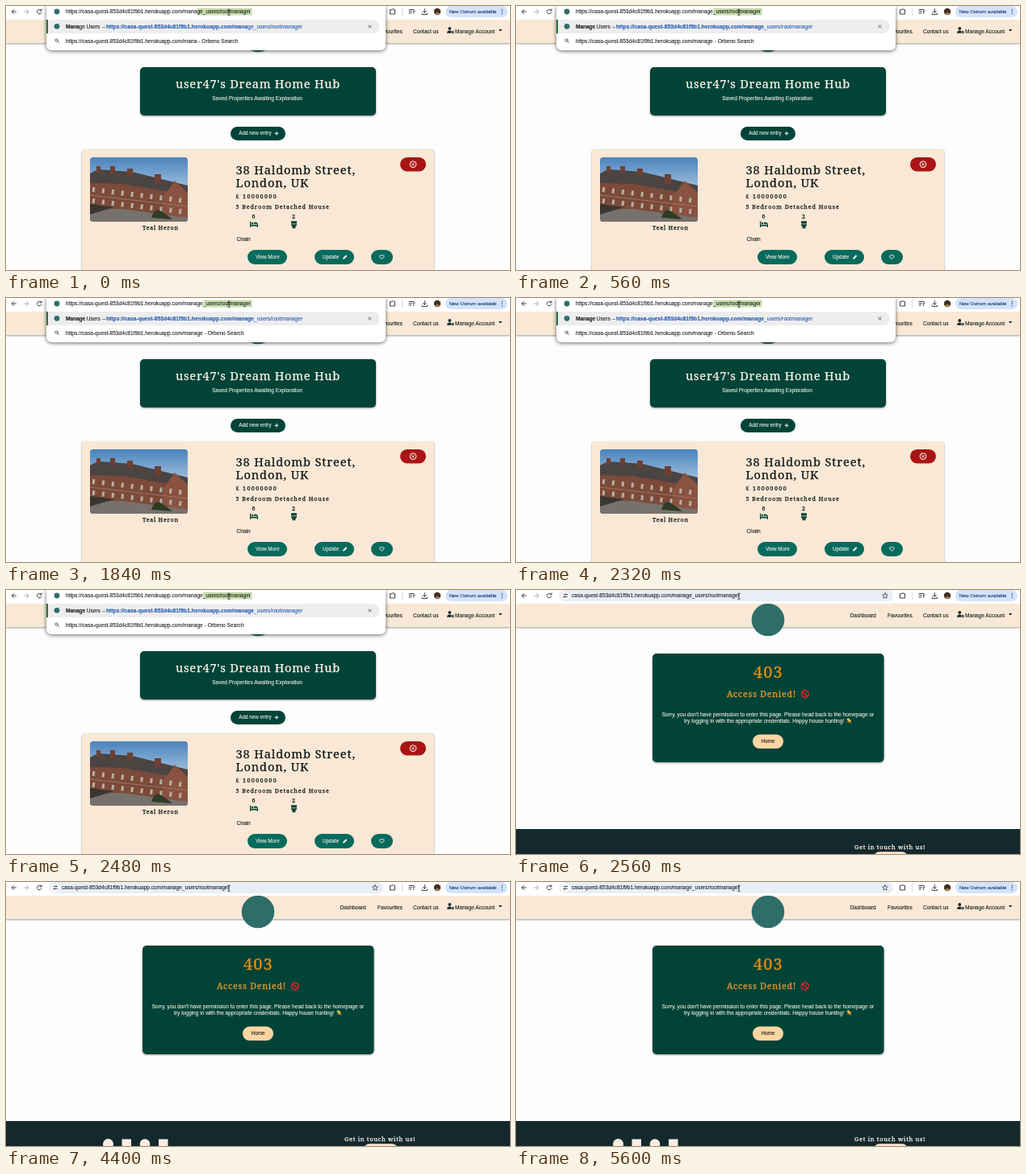
Animation, 624 px wide and 328 px high, one loop 5.68 s. Source, as an HTML page:

```html
<!DOCTYPE html>
<html lang="en">
<head>
<meta charset="utf-8">
<title>Access denied demo</title>
<style>
html, body { margin: 0; width: 100%; height: 100%; overflow: hidden; background: #fdfdfd; }
svg { display: block; width: 624px; height: 328px; }
text {
  --ink: #0c1616;
  font: 6.6px "Liberation Sans", Arial, sans-serif;
  fill: var(--ink); stroke: var(--ink); stroke-width: .08; white-space: pre;
}
.url { font-size: 6.64px; --ink: #17181a; }
.small { font-size: 6.58px; }
.link { --ink: #1c54b2; letter-spacing: .05px; }
.bold { font-weight: 700; }
.serif { font-family: "Noto Serif", serif; stroke-width: .25; }
.head { font-size: 14.6px; letter-spacing: .88px; }
.fact { font-size: 7.1px; letter-spacing: .95px; }
.btn { font-size: 6.3px; }
.light { --ink: #fdf6ee; }
.mid { text-anchor: middle; }
.line { fill: none; stroke: #3c4043; stroke-width: 1; stroke-linecap: round; stroke-linejoin: round; }
.thin { stroke-width: .8; }
.deep { fill: #014337; }
.teal { fill: #066b5d; }
.shade { filter: drop-shadow(0 1px 1px #0006); }

/* One shared 5680 ms clock; every change is a hard cut. */
.before, .after, .social, .sel, .g, .e, .gIn, .eIn { animation: 5680ms step-end infinite; }
.before { animation-name: before; }
.after { animation-name: after; }
.social { animation-name: social; }
.sel { animation-name: select; }
.g { animation-name: boldG; }
.e { animation-name: boldE; }
.gIn { animation-name: typeG; }
.eIn { animation-name: typeE; }
@keyframes before { 0% { visibility: visible } 44.72%, 100% { visibility: hidden } }
@keyframes after { 0% { visibility: hidden } 44.72%, 100% { visibility: visible } }
@keyframes social { 0% { visibility: hidden } 46.48%, 100% { visibility: visible } }
@keyframes select {
  0% { x: 236.8px; width: 67.8px }
  2.817% { x: 240.5px; width: 64.1px }
  5.634%, 100% { x: 244.2px; width: 60.4px }
}
@keyframes boldG { 0% { font-weight: 400 } 2.817%, 100% { font-weight: 700 } }
@keyframes boldE { 0% { font-weight: 400 } 5.634%, 100% { font-weight: 700 } }
@keyframes typeG { 0% { font-size: 0 } 2.817%, 100% { font-size: 6.64px } }
@keyframes typeE { 0% { font-size: 0 } 5.634%, 100% { font-size: 6.64px } }
</style>
</head>
<body>
<svg viewBox="0 0 624 328">
  <defs>
    <linearGradient id="sky" x2="0" y2="1">
      <stop stop-color="#4a83bd"/><stop offset=".5" stop-color="#a3c3de"/>
    </linearGradient>
    <clipPath id="frame"><rect x="104" y="188" width="121" height="80" rx="4"/></clipPath>
  </defs>
  <rect width="624" height="328" fill="#fdfdfd"/>

  <!-- site header -->
  <rect y="17" width="624" height="29" fill="#f9e8d5" class="shade"/>
  <circle cx="312" cy="37" r="20.3" fill="#2f6d69"/>
  <text x="413.5" y="33.8">Dashboard</text>
  <text x="460" y="33.8">Favourites</text>
  <text x="504" y="33.8">Contact us</text>
  <g fill="#14292d">
    <circle cx="549.3" cy="28" r="1.9"/>
    <path d="M546 33.8q0-3.4 3.3-3.4q1.4 0 2 .8l-.4 2.6z"/>
    <circle cx="553" cy="32.4" r="1.2" fill="none" stroke="#14292d" stroke-width="1.1"/>
    <path d="M609.8 29h4.6l-2.3 2.5z"/>
  </g>
  <text x="556" y="33.8">Manage Account</text>

  <!-- browser toolbar -->
  <rect width="624" height="17" fill="#fff"/>
  <g class="line">
    <path d="M12.6 7H7.4M9.8 4.4L7.2 7l2.6 2.6"/>
    <path d="M22.6 7h5.2M25.4 4.4L28 7l-2.6 2.6" stroke="#a9acb0"/>
    <path d="M43.6 5.4A2.8 2.8 0 1 0 43.9 8M44 3.8v2h-2"/>
    <path d="M475.8 4.6h2a1 1 0 0 1 2 0h1.7v5.4h-5.7z"/>
    <path d="M499 4.5h6M499 6.8h3.5M499 9h2.5M504.7 9.3V6h1.5"/>
    <path d="M518.3 3.5v4.6M516.3 6.3l2 2 2-2M515.2 9v1.6h6.2V9"/>
    <path d="M490.5 2.5v9" stroke="#cfdcf2"/>
  </g>
  <circle cx="534" cy="7" r="4.2" fill="#42301f"/>
  <path d="M531 9.8q3-4 6 0q-3 2.6-6 0z" fill="#a08058"/>
  <rect x="544" y="0" width="77" height="14" rx="7" fill="#d3e3fd"/>
  <text x="548.7" y="9.2" style="font-size:6px;--ink:#0b2a57">New Ostrum available</text>
  <g fill="#0b2a57"><circle cx="614.3" cy="4.4" r=".7"/><circle cx="614.3" cy="7" r=".7"/><circle cx="614.3" cy="9.6" r=".7"/></g>

  <g class="before">
    <!-- page banner -->
    <rect x="166" y="76" width="292" height="60" rx="5" class="deep shade"/>
    <text x="312" y="102" class="serif light mid" style="font-size:14.6px;letter-spacing:.75px">user47's Dream Home Hub</text>
    <text x="311" y="117.3" class="light mid">Saved Properties Awaiting Exploration</text>
    <rect x="278" y="150" width="68" height="17" rx="8.5" class="deep"/>
    <text x="288.3" y="160.4" class="light btn">Add new entry</text>
    <path d="M332.6 158.3h4.8M335 155.9v4.8" stroke="#fdf6ee"/>

    <!-- listing -->
    <rect x="94" y="178" width="436" height="160" rx="3" fill="#f9e8d5" class="shade"/>
    <g clip-path="url(#frame)">
      <path d="M104 188h121v80H104z" fill="url(#sky)"/>
      <path d="M104 208l10-5 42 3 69 17v18H104z" fill="#4a4442"/>
      <path d="M112 199h5v8h-5zM129 199h6v9h-6zM150 202h7v9h-7zM184 209h8v12h-8z" fill="#6b4033"/>
      <path d="M104 220l40 1 81 14v33H104z" fill="#7b4a39"/>
      <path d="M194 238l15-21 16 15v36h-31z" fill="#8a5240"/>
      <path d="M107 228L222 242M107 242L222 256" stroke="#b9aea2" stroke-width="6" stroke-dasharray="3 9"/>
      <path d="M104 235l121 14" stroke="#9c745c"/>
      <path d="M104 253l40-1 81 11v5H104z" fill="#77716d"/>
      <path d="M104 246l30 4-30 9z" fill="#39372f"/>
      <path d="M180 263q4-13 12-8t14 10z" fill="#2d3b27"/>
    </g>
    <text x="169" y="278" class="serif" style="font-size:7px;letter-spacing:.8px">Teal Heron</text>
    <text x="284.5" y="208.5" class="serif head">38 Haldomb Street,</text>
    <text x="284.5" y="224.5" class="serif head">London, UK</text>
    <text x="284.5" y="239" class="serif fact" style="letter-spacing:1.4px">£ 10000000</text>
    <text x="284.5" y="251.5" class="serif fact">5 Bedroom Detached House</text>
    <text x="307" y="264" class="serif fact mid">6</text>
    <text x="356.5" y="264" class="serif fact mid">2</text>
    <g class="deep">
      <path d="M302 267.5h1.2v4.3h7.8v-1.5h1v4.7h-1.2v-1.4h-7.6v1.4H302z"/>
      <circle cx="305" cy="270" r="1.2"/>
      <path d="M306.8 268.8h3q1.6 0 1.6 2h-4.6z"/>
      <path d="M353 267.3h7v3.2h-7zM352.8 271.2h7.4q0 2.2-1.9 3l.3 2h-4.2l.3-2q-1.9-.8-1.9-3z"/>
    </g>
    <text x="285.5" y="291.6">Chain</text>
    <g class="teal">
      <rect x="299" y="303" width="49" height="18" rx="9"/>
      <rect x="382" y="303" width="49" height="18" rx="9"/>
      <rect x="452" y="303" width="27" height="18" rx="9"/>
    </g>
    <text x="309" y="314" class="light btn">View More</text>
    <text x="392" y="314" class="light btn">Update</text>
    <path d="M417 314.6l.4-1.9 3.4-3.4 1.5 1.5-3.4 3.4z" fill="#fdf6ee"/>
    <path d="M465.3 314.4l-2.4-2.4a1.5 1.5 0 0 1 2.4-1.9a1.5 1.5 0 0 1 2.4 1.9z" fill="none" stroke="#fdf6ee" stroke-width=".9"/>
    <rect x="488" y="188" width="32" height="17.5" rx="8.7" fill="#a91414"/>
    <g fill="none" stroke="#fff"><circle cx="504" cy="196.7" r="3.9"/><path d="M502.4 195.1l3.2 3.2M505.6 195.1l-3.2 3.2"/></g>

    <!-- address suggestions -->
    <path d="M50 0h420v48q0 7-7 7H57q-7 0-7-7z" fill="#fff" style="filter:drop-shadow(0 1.5px 2.5px #0009)"/>
    <path d="M50 17h404q8.5 0 8.5 8.5T454 34H50z" fill="#ededed"/>
    <path d="M50 17h2v17h-2z" fill="#267148"/>
    <rect class="sel" y="2.5" height="9" x="244.2" width="60.4" fill="#c9deae"/>
    <g fill="#2f6d69"><circle cx="63" cy="7" r="3.4"/><circle cx="63" cy="25.3" r="3.4"/></g>
    <text x="74" y="9.3" class="url">https://casa-quest-853d4c81f9b1.herokuapp.com/manage_users/rootmanager</text>
    <text x="74" y="27.7" class="url" style="letter-spacing:-.1px"><tspan class="bold">Mana</tspan><tspan class="g">g</tspan><tspan class="e">e</tspan> Users</text>
    <text x="119.3" y="27.7" class="url">–</text>
    <text x="124" y="27.7" class="url link"><tspan class="bold">https://casa-quest-853d4c81f9b1.herokuapp.com/mana</tspan><tspan class="g">g</tspan><tspan class="e">e</tspan>_users/rootmanager</text>
    <text x="74" y="45.6" class="url">https://casa-quest-853d4c81f9b1.herokuapp.com/mana<tspan class="gIn">g</tspan><tspan class="eIn">e</tspan> - Orbeno Search</text>
    <g class="line thin"><circle cx="62.5" cy="42.6" r="1.7"/><path d="M63.8 43.9l1.8 1.8M448.9 23.9l3.2 3.2M452.1 23.9l-3.2 3.2"/></g>
  </g>

  <g class="after">
    <!-- address bar -->
    <rect x="53" y="0" width="414" height="14" rx="7" fill="#e9eef6"/>
    <circle cx="61" cy="7" r="5" fill="#fff"/>
    <g class="line thin">
      <path d="M58.6 5.5h2M58.6 8.5h.4M61.6 8.5h2M63.4 5.5h.2"/>
      <circle cx="62" cy="5.5" r=".9"/><circle cx="60.2" cy="8.5" r=".9"/>
      <path d="M457 3.7l1 2.2 2.4.2-1.8 1.6.5 2.4-2.1-1.2-2.1 1.2.5-2.4-1.8-1.6 2.4-.2z"/>
    </g>
    <text x="69" y="9.3" class="url small">casa-quest-853d4c81f9b1.herokuapp.com/manage_users/rootmanager</text>

    <!-- error card -->
    <rect x="169" y="79" width="286.5" height="135" rx="5" class="deep shade"/>
    <text x="312.3" y="109" class="serif mid" style="font-size:20px;letter-spacing:1px;--ink:#ef900f">403</text>
    <text x="261" y="133" class="serif" style="font-size:10.6px;letter-spacing:.8px;--ink:#ef9c32">Access Denied!</text>
    <g fill="none" stroke="#d3222f" stroke-width="1.7"><circle cx="357.8" cy="129.3" r="4.4"/><path d="M354.8 126.3l6 6"/></g>
    <text x="312" y="157" class="light mid small">Sorry, you don't have permission to enter this page. Please head back to the homepage or</text>
    <text x="208" y="164.6" class="light small">try logging in with the appropriate credentials. Happy house hunting!</text>
    <path d="M409.3 160.6l2.2-1.5 3.6 3.4-2 2.4z" fill="#e8b84a"/>
    <path d="M409.6 163.2l2.2 2.2M413.8 164.8l1.8.4" stroke="#b97a3c"/>
    <rect x="293" y="179.5" width="38" height="17.5" rx="8.7" fill="#fcd6a2"/>
    <text x="312" y="190.3" class="mid btn">Home</text>

    <!-- footer -->
    <rect y="297" width="624" height="31" fill="#14292d"/>
    <text x="419" y="322" class="serif light" style="font-size:7.4px;letter-spacing:.72px">Get in touch with us!</text>
    <rect x="442" y="325.3" width="44" height="17" rx="8.5" fill="#fbe6cd"/>
  </g>
  <g class="social" fill="#fbeee0">
    <circle cx="126.5" cy="325.5" r="6.5"/>
    <rect x="143.5" y="319.5" width="11.5" height="11.5"/>
    <circle cx="172" cy="325.5" r="6.3"/>
    <rect x="189" y="319.5" width="11.5" height="11.5"/>
  </g>

  <!-- text cursor -->
  <path d="M274.3 4q1.7 0 1.7 1.2v5.2q0 1.2-1.7 1.2M277.7 4q-1.7 0-1.7 1.2M276 10.4q0 1.2 1.7 1.2" fill="none" stroke="#222" stroke-width=".8"/>
</svg>
</body>
</html>
```
